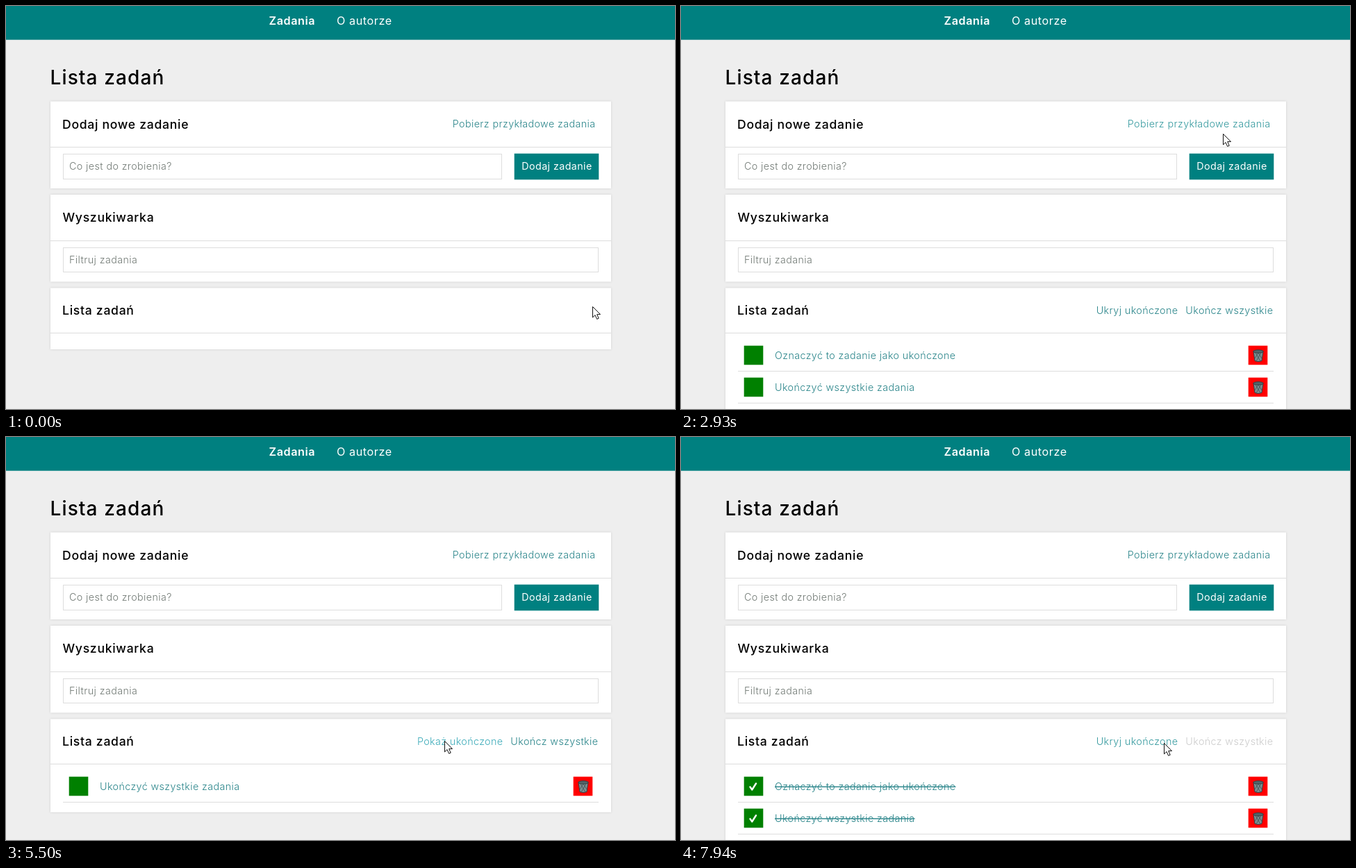
Animation of 963 by 581 pixels, one loop 8 s. Source, as an HTML page:

```html
<!DOCTYPE html>
<html lang="pl">
<head>
<meta charset="utf-8">
<title>Lista zadań</title>
<style>
  html, body { margin: 0; width: 100%; height: 100%; overflow: hidden; background: #eee; }
  svg { display: block; }
  text { font: 350 14.3px Inter, "Open Sans", sans-serif; letter-spacing: .028em; white-space: pre; }
  .nav { font-size: 16.2px; font-weight: 400; letter-spacing: .035em; fill: #fff; }
  .bold { font-weight: 600; }
  .title { font-size: 28px; font-weight: 450; letter-spacing: .04em; }
  .heading { font-size: 17.6px; font-weight: 500; letter-spacing: .04em; }
  .hint { fill: #727a75; }
  .button { fill: #fff; font-weight: 400; text-anchor: middle; }
  .link { fill: #2a858a; text-anchor: end; }
  .task { fill: #2a858a; }
  .done { text-decoration: line-through; }
  .card { fill: #fff; filter: drop-shadow(0 0 1.5px #ccc); }
  .field { fill: #fff; stroke: #ddd; }
  .rule { stroke: #ddd; }
</style>
</head>
<body>
<svg width="963" height="581" viewBox="0 0 963 581">
  <defs>
    <g id="bin">
      <rect x="816.7" y="489.7" width="27.6" height="27.6" fill="#f00"/>
      <path d="M824 498 L826 511.5 Q831 514 836 511.5 L838 498Z" fill="#7d8f92" stroke="#333f42"/>
      <path d="M827 500 L834 512 M831 500 L836 508 M835 500 L828 512 M831 500 L826 508" stroke="#435054" stroke-width=".8"/>
      <ellipse cx="831" cy="498" rx="7.3" ry="2.2" fill="#52656a" stroke="#333f42"/>
    </g>
    <path id="tick" d="M99.5 504.5 L102.3 508.5 L108 499.5" fill="none" stroke="#fff"
      stroke-width="2.4" stroke-linecap="round" stroke-linejoin="round"/>
  </defs>

  <rect width="963" height="48.7" fill="#008080"/>
  <text class="nav bold" x="378.5" y="27">Zadania</text>
  <text class="nav" x="476" y="27">O autorze</text>
  <text class="title" x="63.5" y="113">Lista zadań</text>

  <rect class="card" x="64" y="137.5" width="807" height="125.5"/>
  <path class="rule" d="M64 203.5H871"/>
  <text class="heading" x="81" y="176.5">Dodaj nowe zadanie</text>
  <text class="link" id="fetch" x="848.5" y="175"></text>
  <rect class="field" x="82.5" y="213.5" width="631" height="36"/>
  <text class="hint" x="91" y="236">Co jest do zrobienia?</text>
  <rect x="731.7" y="212.7" width="121.6" height="37.6" fill="#008080"/>
  <text class="button" x="793" y="236">Dodaj zadanie</text>

  <rect class="card" x="64" y="272" width="807" height="125.5"/>
  <path class="rule" d="M64 338.5H871"/>
  <text class="heading" x="81.5" y="311">Wyszukiwarka</text>
  <rect class="field" x="82.5" y="348.5" width="770" height="35"/>
  <text class="hint" x="91" y="371">Filtruj zadania</text>

  <rect class="card" id="list" x="64" y="406.5" width="807"/>
  <path class="rule" d="M64 471.5H871"/>
  <text class="heading" x="81" y="444.5">Lista zadań</text>
  <g id="actions">
    <text class="link" id="toggle" x="715.5" y="443.5"></text>
    <text class="link" id="finish" x="852.5" y="443.5">Ukończ wszystkie</text>
  </g>
  <g id="rows"></g>

  <path id="arrow" d="M.5 .5V16L4 12.6L6.6 18.4L9.2 17.3L6.7 11.6H11.5Z" fill="#fff" stroke="#111"/>
  <path id="hand" d="M-1.5 14V2Q-1.5 .5 0 .5T1.5 2V8Q2 6.6 3.4 7T4.8 9Q5.2 7.8 6.5 8.2T8 10
    Q8.6 9 9.8 9.6T11 11.5V17Q10.5 20 9 21.5V23.5H0V21.5L-5 15Q-6.2 13 -5 12.3T-1.5 14Z
    M1.5 8V12.5M4.8 9V12.5M8 10V12.5" fill="#fff" stroke="#111"/>
</svg>
<script>
const LOOP = 8000;
const LINK = '#2a858a', HOVER = '#3cabb9', DISABLED = '#ccc';
const CLICK = { fetch: 920, loaded: 2430, check: 4370, hide: 5360, show: 6770, finish: 7360 };

// Pointer stops: time, x, y
const path = [
  [70, 844, 433], [860, 780, 151], [920, 780, 151], [1250, 780, 156], [2110, 780, 156],
  [2310, 781, 165], [2440, 781, 167], [2860, 780, 184], [2930, 780, 184], [3680, 208, 545],
  [3740, 208, 545], [4230, 116, 507], [4440, 116, 507], [5030, 631, 438], [6020, 631, 438],
  [6500, 694, 438], [6770, 694, 438], [7250, 786, 437], [7520, 786, 437], [7940, 695, 441]
];

const $ = id => document.getElementById(id);
const ramp = (t, from, to) => Math.min(1, Math.max(0, (t - from) / (to - from)));
const mix = (a, b, k) => `color-mix(in srgb, ${b} ${k * 100}%, ${a})`;
const show = (el, on) => el.setAttribute('visibility', on ? 'inherit' : 'hidden');

// Colour at time t, fading over 300 ms at each [start, colour] step
const fade = (t, first, ...steps) =>
  steps.reduce((colour, [at, next]) => t < at ? colour : mix(colour, next, ramp(t, at, at + 300)), first);

function pointer(t) {
  const i = path.findIndex(stop => stop[0] > t);
  if (i < 1) return (i ? path.at(-1) : path[0]).slice(1);
  const [a, b] = [path[i - 1], path[i]];
  const k = ramp(t, a[0], b[0]), eased = k * k * (3 - 2 * k);
  return [1, 2].map(n => a[n] + (b[n] - a[n]) * eased);
}

const rows = ['Oznaczyć to zadanie jako ukończone', 'Ukończyć wszystkie zadania'].map(label => {
  const g = document.createElementNS('http://www.w3.org/2000/svg', 'g');
  g.innerHTML = `<rect x="90.7" y="489.7" width="27.6" height="27.6" fill="#008000"/>
    <use href="#tick"/><text class="task" x="135" y="509">${label}</text>
    <use href="#bin"/><path class="rule" d="M82 526.5H853"/>`;
  $('rows').append(g);
  return { g, box: g.querySelector('rect'), tick: g.querySelector('use'), text: g.querySelector('text') };
});

function setRow(row, slot, visible, done) {
  row.g.setAttribute('transform', `translate(0 ${slot * 46})`);
  show(row.g, visible);
  show(row.tick, visible && done);
  row.text.classList.toggle('done', done);
}

function draw(t) {
  const loading = t >= CLICK.fetch && t < CLICK.loaded;
  const loaded = t >= CLICK.loaded;
  const hidden = t >= CLICK.hide && t < CLICK.show;

  $('fetch').textContent = loading ? 'Ładowanie...' : 'Pobierz przykładowe zadania';
  $('fetch').style.fill = loaded
    ? fade(t, DISABLED, [CLICK.loaded, '#369a9f'], [2930, LINK])
    : fade(t, LINK, [560, HOVER], [CLICK.fetch, DISABLED]);

  show($('actions'), loaded);
  $('toggle').textContent = hidden ? 'Pokaż ukończone' : 'Ukryj ukończone';
  $('toggle').style.fill = fade(t, LINK, [4730, HOVER], [6900, LINK], [7640, '#369a9f']);
  $('finish').style.fill = fade(t, LINK, [7000, HOVER], [CLICK.finish, DISABLED]);

  $('list').setAttribute('height', !loaded ? 88.5 : hidden ? 134.5 : 180.5);
  setRow(rows[0], 0, loaded && !hidden, t >= CLICK.check);
  setRow(rows[1], hidden ? 0 : 1, loaded, t >= CLICK.finish);
  rows[0].box.style.fill = fade(t, '#008000', [4080, '#009900'], [4520, '#008000']);

  const [x, y] = pointer(t);
  const pointing = t >= 760 && t < 2440;
  show($('arrow'), !pointing);
  show($('hand'), pointing);
  for (const id of ['arrow', 'hand']) $(id).setAttribute('transform', `translate(${x} ${y})`);
}

const start = performance.now();
function frame() {
  draw((performance.now() - start) % LOOP);
  requestAnimationFrame(frame);
}
frame();
</script>
</body>
</html>
```
